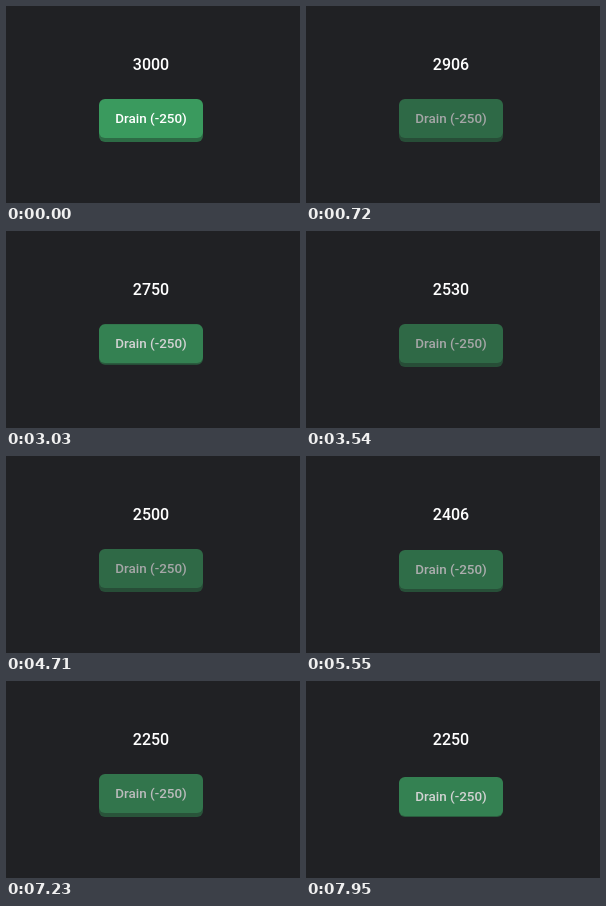
An HTML page that plays this animation: 294x197 px, repeating every 8000 ms.

```html
<!DOCTYPE html>
<html lang="en">
<head>
<meta charset="utf-8">
<title>Drain counter</title>
<style>
  html, body {
    margin: 0;
    width: 100%;
    height: 100%;
    overflow: hidden;
    background: #202124;
  }
  body {
    position: relative;
    color: #fff;
    font-family: Roboto, Arial, sans-serif;
  }
  #count {
    position: absolute;
    left: 95px;
    top: 49px;
    width: 100px;
    font-size: 16px;
    font-weight: 500;
    line-height: 20px;
    text-align: center;
  }
  #drain {
    --up: 0 4px #2d6b45;
    --down: 0 1px #2d6b45;
    position: absolute;
    left: 93px;
    top: 93px;
    width: 104px;
    height: 39px;
    padding: 0;
    border: 0;
    border-radius: 6px;
    background: #3a9a5e;
    box-shadow: var(--up);
    color: #fff;
    font: 500 13.45px/39px Roboto, Arial, sans-serif;
    text-align: center;
    animation: fade 8s linear infinite, sink 8s ease infinite, flatten 8s ease infinite;
  }
  /* idle 1, hover .8, disabled .6 */
  @keyframes fade {
    0%, 2.45% { opacity: 1; }
    3.1%, 8.09% { opacity: .8; }
    9%, 29.3% { opacity: .6; }
    30%, 38.91% { opacity: .8; }
    39.8%, 60.4% { opacity: .6; }
    60.75%, 68.85% { opacity: .8; }
    69.5%, 90.05% { opacity: .6; }
    90.75%, 100% { opacity: .8; }
  }
  @keyframes sink {
    0%, 7.85% { transform: none; }
    8.3% { transform: translateY(3px); }
    9.1%, 37.85% { transform: none; }
    38.5%, 39.1% { transform: translateY(3px); }
    40%, 67.48% { transform: none; }
    68.1%, 69.03% { transform: translateY(3px); }
    69.95%, 98.85% { transform: none; }
    99.35%, 100% { transform: translateY(3px); }
  }
  @keyframes flatten {
    0%, 7.6% { box-shadow: var(--up); }
    8.2% { box-shadow: var(--down); }
    9.1%, 37.6% { box-shadow: var(--up); }
    38.2%, 39.1% { box-shadow: var(--down); }
    40%, 67.2% { box-shadow: var(--up); }
    67.8%, 69.03% { box-shadow: var(--down); }
    69.95%, 98.7% { box-shadow: var(--up); }
    99.3%, 100% { box-shadow: var(--down); }
  }
</style>
</head>
<body>
<div id="count">3000</div>
<button id="drain" type="button" tabindex="-1">Drain (-250)</button>
<script>
  const LOOP = 8000, TICK = 106, DRAIN = 250;
  const clicks = [637, 3103, 5498];
  const label = document.getElementById('count');

  // Tie the button's animations to the same clock as the counter
  for (const a of document.getAnimations()) a.startTime = 0;

  // Amount still to drain after each tick: shrinks by thirds, then by ones
  const left = [156];
  while (left.at(-1) > 0) {
    const r = left.at(-1);
    left.push(r > 8 ? Math.floor(r * 2 / 3) : r - 1);
  }

  function valueAt(t) {
    return clicks.reduce((value, start) => {
      if (t < start) return value;
      const step = Math.floor((t - start) / TICK);
      return value - DRAIN + (left[step] || 0);
    }, 3000);
  }

  function draw() {
    const text = String(valueAt(performance.now() % LOOP));
    if (label.textContent !== text) label.textContent = text;
    requestAnimationFrame(draw);
  }
  draw();
</script>
</body>
</html>
```
